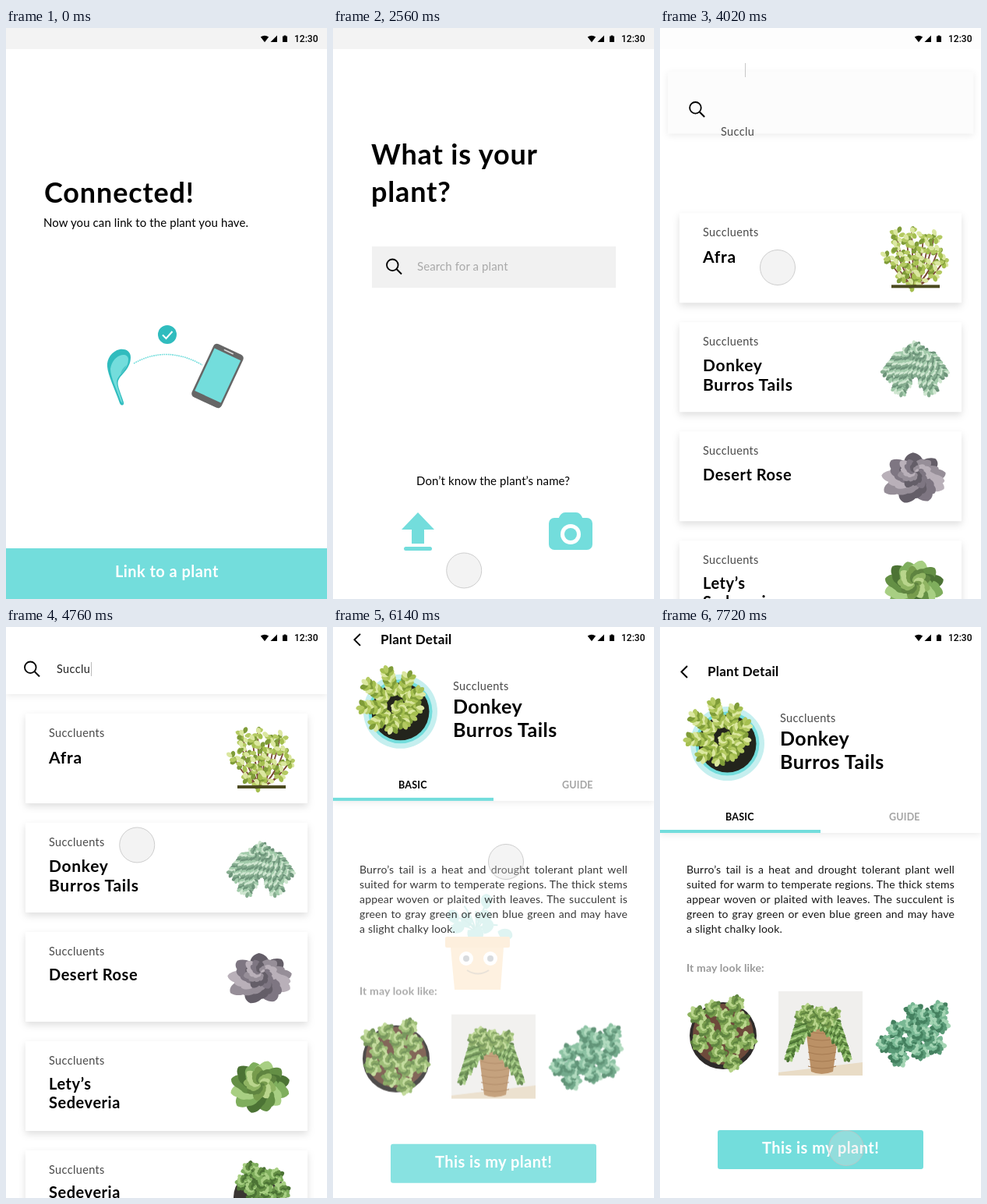
Write an HTML page that moves like this. It is 412 px wide and 732 px high and loops after 8000 ms.

```html
<!DOCTYPE html>
<html lang="en">
<head>
<meta charset="utf-8">
<title>Plant linking</title>
<style>
html, body { margin: 0; width: 100%; height: 100%; overflow: hidden; background: #fff; }
svg { display: block; width: 100vw; height: 100vh; }
text, .para { font-family: Lato, "Open Sans", sans-serif; }
.h1 { font-size: 36px; font-weight: 700; letter-spacing: .85px; }
.h2 { font-size: 25px; font-weight: 700; letter-spacing: .5px; }
.name { font-size: 21px; font-weight: 700; letter-spacing: .7px; }
.name.small { font-size: 20px; letter-spacing: .55px; }
.body { font-size: 15px; letter-spacing: .1px; }
.kind { font-size: 14.5px; letter-spacing: .35px; fill: #4a4a4a; }
.btn { font-size: 20px; font-weight: 700; letter-spacing: .45px; fill: #fff; }
.bar { font-size: 17px; font-weight: 700; letter-spacing: .25px; }
.tab { font-size: 12.5px; font-weight: 700; letter-spacing: .2px; }
.look { font-size: 14px; font-weight: 700; letter-spacing: .15px; fill: #999; }
.clock { font: 500 12px Roboto, sans-serif; }
.hint { fill: #a9a9a9; }
.para { font-size: 14px; line-height: 19px; letter-spacing: .2px; color: #151515; }
.para div { white-space: nowrap; text-align-last: justify; }
.para div:last-child { text-align-last: left; }
.card { filter: drop-shadow(0 4px 5px rgba(0, 0, 0, .13)); }
#field, #top rect:first-child { filter: drop-shadow(0 2px 4px rgba(0, 0, 0, .08)); }
</style>
</head>
<body>
<svg id="stage" viewBox="0 0 412 732" preserveAspectRatio="none"></svg>
<script>
const AQUA = '#73dddc', TEAL = '#30bcbe';
let seed = 7;
const rnd = () => (seed = (seed * 16807) % 2147483647) / 2147483647;
const range = n => [...Array(n).keys()];
const mix = (a, b, k) => a + (b - a) * k;

// ---- drawing helpers ----
const text = (x, y, cls, str, fill = '') =>
  `<text x="${x}" y="${y}" class="${cls}" ${fill && `style="fill:${fill}"`}>${str}</text>`;
const circle = (x, y, r, fill) => `<circle cx="${x}" cy="${y}" r="${r}" fill="${fill}"/>`;
const rect = (x, y, w, h, fill, rx = 0, extra = '') =>
  `<rect x="${x}" y="${y}" width="${w}" height="${h}" rx="${rx}" fill="${fill}" ${extra}/>`;
const path = (d, fill) => `<path d="${d}" fill="${fill}"/>`;
const line = (d, color, w, extra = '') =>
  `<path d="${d}" fill="none" stroke="${color}" stroke-width="${w}" ${extra}/>`;
const group = (id, body) => `<g id="${id}">${body}</g>`;

// ---- plant helpers ----
const leaf = (x, y, len, w, deg, fill) =>
  `<path transform="translate(${x.toFixed(1)} ${y.toFixed(1)}) rotate(${deg.toFixed(0)})" fill="${fill}"
   d="M0 0C${w * 1.2} ${-len * .3} ${w * 1.2} ${-len * .9} 0 ${-len}C${-w * 1.2} ${-len * .9} ${-w * 1.2} ${-len * .3} 0 0Z"/>`;

// rings of leaves, dark outside to light inside
function rosette(x, y, r, shades, flat = 1, n = 8) {
  const turn = rnd() * 90;
  const leaves = range(5).map(i => range(n).map(j => {
    const len = r * (1 - i * .18) * mix(.9, 1.05, rnd());
    return leaf(0, 0, len, len * .3, turn + (j + i / 2) * 360 / n, shades[(i + j) % shades.length]);
  }).join('')).join('');
  return `<g transform="translate(${x.toFixed(1)} ${y.toFixed(1)}) scale(1 ${flat})">${leaves}</g>`;
}

// a stem with leaves on both sides
function strand(x1, y1, x2, y2, len, shades) {
  const n = Math.ceil(Math.hypot(x2 - x1, y2 - y1) / (len * .4));
  const dir = Math.atan2(y2 - y1, x2 - x1) * 180 / Math.PI + 90;
  return range(n).map(i => [-50, 50, 0].map((a, j) =>
    leaf(mix(x1, x2, i / n), mix(y1, y2, i / n), len, len * .32, dir + a + rnd() * 16 - 8, shades[(i + j) % shades.length])
  ).join('')).join('');
}

// golden-angle points filling an ellipse, outermost first
const spread = (n, cx, cy, rx, ry) => range(n).reverse().map(i => {
  const r = Math.sqrt((i + .3) / n), a = i * 2.4;
  return [cx + rx * r * Math.cos(a), cy + ry * r * Math.sin(a)];
});
const clumps = (pts, r, shades, n = 7) => pts.map(([x, y]) => rosette(x, y, r, shades, 1, n)).join('');

const LIME = ['#7f9c38', '#b4ca62', '#dbe7a0', '#a5bf50'];
const GREEN = ['#4c7335', '#7fae5d', '#a8cf83', '#648f45'];
const MOSS = ['#5f8440', '#8fb462', '#b9d58c', '#779c4d'];
const MINT = ['#44805f', '#79b894', '#a3d4b3', '#5a9a77'];
const SAGE = ['#6d947a', '#a3cbab', '#cfe6d0', '#86ad90'];
const MAUVE = ['#645e68', '#968e98', '#b9b0b9', '#7e7682'];

// ---- card plants, y measured from the card top ----
function jade() {
  const tips = spread(22, 327, 56, 38, 38);
  return tips.map(([x, y]) => line(`M327 95Q${mix(327, x, .7)} ${mix(y, 95, .6)} ${x} ${y}`, '#7b4a35', 1.8)).join('') +
    tips.map(([x, y]) => range(7).map(i =>
      leaf(x + rnd() * 6 - 3, y + rnd() * 6 - 3, 9, 3.2, i * 51 + rnd() * 40, LIME[i % 4])).join('')).join('') +
    rect(297, 92, 62, 4, '#4b4a20');
}
const trailing = () => range(12).map(i => {
  const x = 289 + i * 7, drop = 66 + 26 * Math.sin(Math.PI * i / 5.5) ** 2;
  return strand(mix(327, x, .5), 34 + Math.abs(i - 5.5), x, drop, 8, SAGE);
}).join('') + clumps(spread(4, 327, 37, 20, 6), 10, SAGE);
const desertRose = () => rosette(327, 60, 45, MAUVE, .72, 9) + rosette(327, 52, 25, MAUVE, .9, 7);
const sedeveria = () => rosette(326, 58, 39, GREEN, .88, 12) + rosette(326, 54, 22, MOSS, 1, 9);
const potted = () => circle(326, 60, 34, '#3a3533') + clumps(spread(9, 326, 44, 30, 24), 13, GREEN);

// ---- detail pictures ----
const heroPlant = () => circle(86.5, 149.5, 47.5, '#c5efef') + circle(86.5, 149.5, 41, AQUA) +
  circle(86.5, 149.5, 37, '#23241c') + range(10).map(i => {
    const a = i * Math.PI / 5, reach = 37 + 15 * Math.cos(a - 3.9);
    const x = 84 + reach * Math.cos(a), y = 144 + reach * Math.sin(a);
    return strand(mix(84, x, .3), mix(144, y, .3), x, y, 11, LIME);
  }).join('') + rosette(85, 145, 12, LIME);

const photoPot = () => circle(81, 524, 43, '#2e2b2a') + circle(81, 522, 39, '#6d4a3b') +
  clumps(spread(13, 82, 519, 40, 44), 13, MOSS);

const photoBasket = () => rect(152, 467, 108, 108, '#f0efed') + path('M152 571L260 558V575H152Z', '#e9dcc6') +
  path('M186 507H231L222 570Q207 576 194 570Z', '#bb9166') +
  range(6).map(i => line(`M190 ${518 + i * 9}Q208 ${524 + i * 9} 226 ${518 + i * 9}`, '#a67b52', 1)).join('') +
  range(11).map(i => {
    const k = i / 5 - 1, x = 203 + 38 * k;
    return strand(mix(203, x, .6), 496 + 8 * Math.abs(k), x, 512 + 42 * Math.abs(k) ** 1.5, 7, GREEN);
  }).join('') + clumps(spread(8, 203, 500, 30, 10), 10, MOSS);

const photoCluster = () => `<g transform="rotate(-38 328 523)">${clumps(spread(14, 328, 523, 46, 31), 14, MINT, 6)}</g>`;

const potFace = () => spread(11, 182, 375, 36, 24).map(([x, y], i) =>
    line(`M184 400Q184 380 ${x} ${y}`, '#2fb3a6', 2) + leaf(x, y + 8, 20, 8, i * 55, '#3cc0b0')).join('') +
  rect(144, 397, 83, 14, '#f6a030', 2) + path('M151 411H219L215 465H156Z', '#f9ac40') +
  [171, 202].map(x => circle(x, 425, 9, '#fff') + circle(x, 425, 4, '#123')).join('') +
  line('M172 440Q186 449 200 440', '#7a4a10', 2);

// ---- screens ----
const connected = text(49, 224, 'h1', 'Connected!') +
  text(48, 255, 'body', 'Now you can link to the plant you have.') +
  circle(207, 393, 12, TEAL) + line('M201 393.5l4.5 4.5 8-9', '#fff', 2) +
  path('M160 422C160 414 153 411 146 412C136 414 129 424 130 434C131 446 139 461 146 481C148 485 152 484 151 480C146 464 141 456 145 450C149 443 160 436 160 422Z', TEAL) +
  path('M157 425C157 419 151 418 146 420C139 423 135 430 134 437C134 447 142 463 147 478L150 482C146 466 140 456 143 450C146 443 157 437 157 425Z', AQUA) +
  path('M155 432Q153 439 147 444Q148 437 155 432Z', '#4fc6c8') +
  line('M164 430Q206 406 252 432', AQUA, 1.6, 'stroke-dasharray="1.8 .9"') +
  `<g transform="translate(271.5 446) rotate(25)">${rect(-21, -37.5, 42, 75, '#666', 5)}${rect(-18.5, -30.5, 37, 60, AQUA)}
   ${line('M-6 -34H6', '#ddd', 1.5, 'stroke-linecap="round"')}</g>` +
  rect(0, 667, 412, 65, AQUA) + text(140, 704, 'btn', 'Link to a plant');

const footer = text(107, 586, 'body', 'Don’t know the plant’s name?') +
  path('M109 621L130 643H117V661H101V643H88Z', AQUA) + rect(91, 665, 36, 5, AQUA, 2.5) +
  rect(277, 628, 56, 41, AQUA, 7) + path('M289 630Q292 621 298 621H312Q318 621 321 630Z', AQUA) +
  circle(305, 649, 13, '#fff') + circle(305, 649, 8, AQUA);

const cards = [
  ['Afra', jade], ['Donkey|Burros Tails', trailing], ['Desert Rose', desertRose],
  ['Lety’s|Sedeveria', sedeveria], ['Sedeveria', potted]
].map(([names, plant], i) => `<g transform="translate(0 ${111 + i * 140})">` +
  rect(25, 0, 362, 115, '#fff', 1, 'class="card"') + text(55, 30, 'kind', 'Succluents') +
  names.split('|').map((n, k) => text(55, 64 - i * .8 + k * 24.5, i < 2 ? 'name' : 'name small', n)).join('') +
  plant() + '</g>').join('');

const lines = ['Burro’s tail is a heat and drought tolerant plant well', 'suited for warm to temperate regions. The thick stems',
  'appear woven or plaited with leaves. The succulent is', 'green to gray green or even blue green and may have', 'a slight chalky look.'];

const detail = group('pot', potFace()) +
  group('about', `<foreignObject x="34" y="301" width="344" height="100"><div class="para" xmlns="http://www.w3.org/1999/xhtml">
    ${lines.map(l => `<div>${l}</div>`).join('')}</div></foreignObject>`) +
  group('photos', text(34, 442, 'look', 'It may look like:') + photoPot() + photoBasket() + photoCluster()) +
  group('mine', rect(74, 645, 264, 50, AQUA, 3) + text(131, 675, 'btn', 'This is my plant!')) +
  group('top', rect(0, -20, 412, 284, '#fff') + line('M35 50L27.5 57.5L35 65', '#000', 2) +
    text(61, 63, 'bar', 'Plant Detail') + heroPlant() + text(154, 122, 'kind', 'Succluents') +
    text(154, 152, 'h2', 'Donkey') + text(154, 182, 'h2', 'Burros Tails') +
    text(84, 248, 'tab', 'BASIC') + text(294, 248, 'tab', 'GUIDE', '#a5a5a5') + rect(0, 260, 206, 4, AQUA));

document.getElementById('stage').innerHTML = rect(0, 0, 412, 732, '#fff') +
  group('connected', connected) +
  group('search',
    group('title', text(49, 175, 'h1', 'What is your') + text(49, 223, 'h1', 'plant?')) +
    group('footer', footer) + group('cards', cards) +
    rect(50, 280, 313, 53, '#f1f1f1', 0, 'id="field"') +
    group('lens', '<circle cx="76.3" cy="303.8" r="7.3" fill="none" stroke="#000" stroke-width="1.8"/>' +
      line('M81.5 309L88 315.5', '#000', 2)) +
    group('hint', text(108, 311, 'body hint', 'Search for a plant')) +
    group('typed', text(65, 59, 'kind', 'Succlu', '#222')) + rect(109, 45, 1, 18, '#bbb', 0, 'id="caret"')) +
  group('detail', detail) +
  rect(0, 0, 412, 27, '#f3f3f3', 0, 'id="strip"') +
  path('M326.8 11.6Q332 8 337.2 11.6L332 18.3Z', '#000') + path('M348 9.5V18H339.5Z', '#000') +
  path('M355 10.5H356.7V9.5H359.3V10.5H361V18H355Z', '#000') + text(370, 18, 'clock', '12:30') +
  '<circle id="cursor" r="22.5" stroke="#c2c2c2" stroke-width=".8"/>';

// ---- motion ----
const LOOP = 8000, SWAP = 2055, TO_LIST = 3847, TO_DETAIL = 5950, SPAN = 350;
const HOME = [430, 350];
// each cursor move: begin, end, x, y
const moves = [
  [430, 580, 286, 576], [818, 1400, 170, 712], [1540, 1800, 168, 703], [2558, 2780, 178, 330],
  [2998, 3460, 151, 307], [4438, 4760, 168, 280], [4760, 5000, 205, 196], [5000, 5480, 222, 301],
  [7038, 7320, 255, 480], [7320, 7720, 239, 668]];

// cubic-bezier(.25, .1, .25, 1)
function ease(x) {
  if (x <= 0) return 0;
  if (x >= 1) return 1;
  const bez = (s, a, b) => 3 * (1 - s) ** 2 * s * a + 3 * (1 - s) * s * s * b + s ** 3;
  let lo = 0, hi = 1;
  for (let i = 0; i < 24; i++) {
    const mid = (lo + hi) / 2;
    if (bez(mid, .25, .25) < x) lo = mid; else hi = mid;
  }
  return bez(lo, .1, 1);
}

const el = id => document.getElementById(id);
const attrs = (id, o) => Object.entries(o).forEach(([k, v]) => el(id).setAttribute(k, v));
const show = (id, on) => attrs(id, { display: on ? 'inline' : 'none' });
const fade = (id, o) => attrs(id, { opacity: Math.max(0, o).toFixed(3) });
const move = (id, x, y) => attrs(id, { transform: `translate(${x.toFixed(2)} ${y.toFixed(2)})` });

const cursorAt = t => moves.reduce(([x, y], [begin, end, tx, ty]) => {
  const left = 1 - Math.min(1, Math.max(0, (t - begin) / (end - begin)));
  const k = 1 - left ** 1.5;
  return [mix(x, tx, k), mix(y, ty, k)];
}, HOME);

function render(t) {
  const p = ease((t - TO_LIST) / SPAN), q = ease((t - TO_DETAIL) / SPAN);
  show('connected', t < SWAP);
  show('search', t >= SWAP && q < .8);
  show('detail', q > 0);
  show('cards', p > 0);
  fade('strip', 1 - p);

  // search page turns into the list
  fade('title', 1 - p * 1.25);
  move('title', 0, -300 * p);
  fade('footer', 1 - p * 1.25);
  move('footer', 0, 200 * p);
  move('cards', 0, 630 * (1 - p));
  const shade = Math.round(mix(241, 255, p));
  attrs('field', { x: 50 * (1 - p), y: 280 * (1 - p), width: 313 + 99 * p, height: 53 + 33 * p,
    fill: `rgb(${shade},${shade},${shade})` });
  el('field').style.filter = p ? '' : 'none';
  const dx = -45 * p + 32 * p * (1 - p), dy = -252 * p;
  move('lens', dx, dy);
  move('hint', dx, dy);
  fade('hint', 1 - p * 1.25);
  move('typed', 65 * (1 - p), 395 * (1 - p));
  fade('typed', p);
  fade('caret', p);
  fade('search', 1 - q * 1.25);

  // detail page slides together
  const r = 1 - q;
  fade('pot', r);
  fade('about', q);
  fade('photos', q);
  move('photos', 0, 190 * r);
  fade('mine', q);
  move('mine', 0, 114 * r);
  move('top', 0, -264 * r);

  show('cursor', t >= 435);
  move('cursor', ...cursorAt(t));
  attrs('cursor', { fill: t < 5750 ? 'rgba(241,241,241,.85)' : 'rgba(218,218,218,.3)' });
}

const start = performance.now();
function tick() {
  render((performance.now() - start) % LOOP);
  requestAnimationFrame(tick);
}
tick();
</script>
</body>
</html>
```
